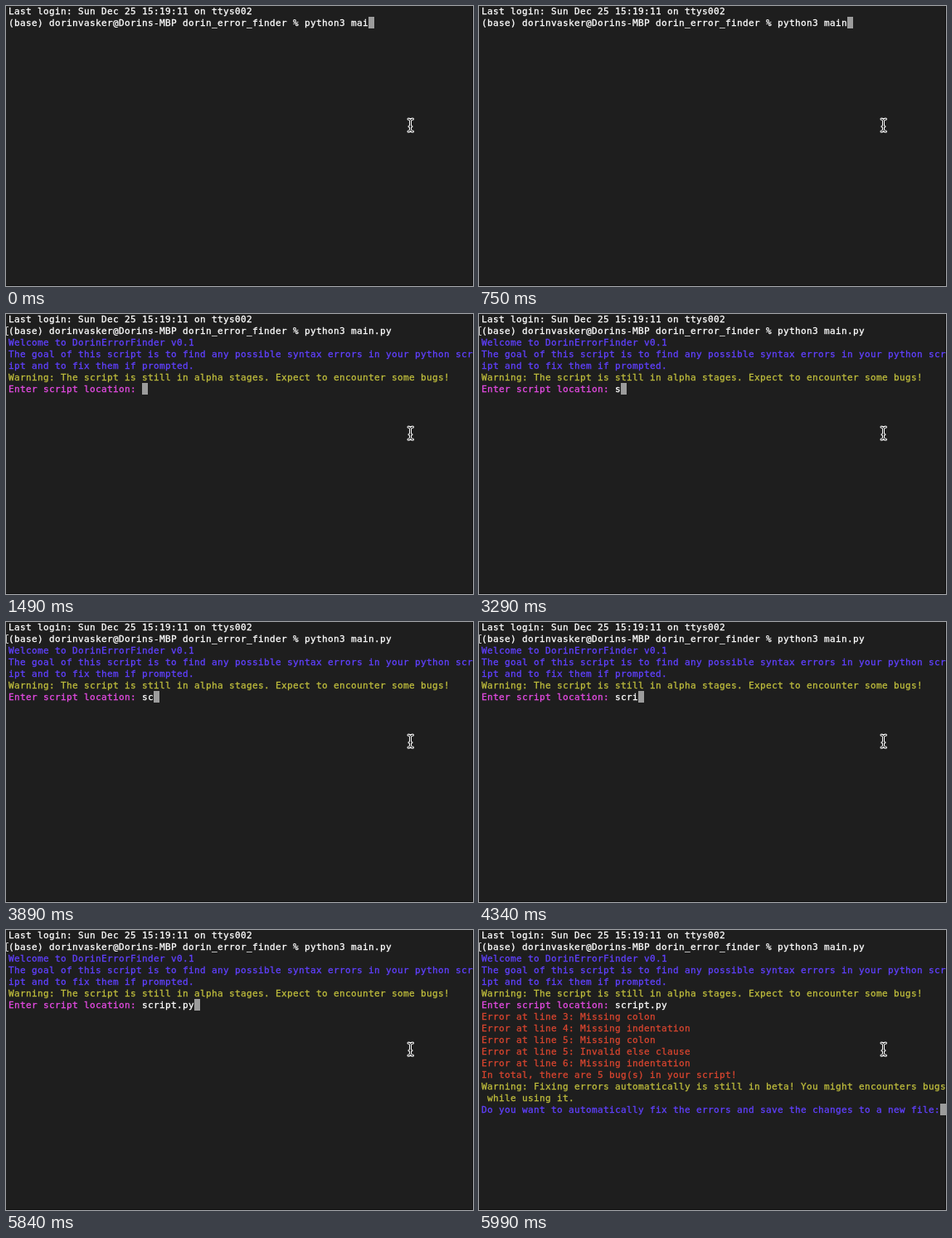
Animation, 563 px wide and 337 px high, one loop 8000 ms. Source, as an HTML page:

```html
<!DOCTYPE html>
<html lang="en">
<head>
<meta charset="utf-8">
<title>Terminal session</title>
<style>
  html, body { margin: 0; width: 100%; height: 100%; overflow: hidden; background: #1e1e1e; }
  svg { display: block; width: 563px; height: 337px; }
  text {
    font: 11px "DejaVu Sans Mono", "Liberation Mono", monospace;
    white-space: pre;
    stroke-width: .3px;
  }
</style>
</head>
<body>
<svg viewBox="0 0 563 337">
  <rect width="563" height="337" fill="#1e1e1e"/>
  <path d="M562.5 0V336.5H0" fill="none" stroke="#101010"/>
  <g id="screen"></g>
  <path id="mark" d="M3 15.5H.5V25.5H3" fill="none" stroke="#c4c4c4"/>
  <rect id="cursor" width="7" height="14" fill="#9c9c9c"/>
  <g fill="none" stroke-linecap="round" stroke-linejoin="round">
    <path id="beam" d="M485 136Q487.5 136 487.5 138.5Q487.5 136 490.500 136M487.500 138.500V148.500M485 151Q487.500 151 487.500 148.500Q487.500 151 490.500 151M486 145H489" stroke="#fff" stroke-width="3"/>
    <use href="#beam" id="core"/>
  </g>
</svg>
<script>
const LOOP = 8000, CELL = 7, ROW = 14, LEFT = 3;
const WHITE = '#ffffff', BLUE = '#6040ff', YELLOW = '#bfbd3c', PINK = '#e44be2', RED = '#d8452f';
const SHELL = '(base) dorinvasker@Dorins-MBP dorin_error_finder % python3 ';
const ASK = 'Enter script location: ';
const RUN_AT = 1490, RESULT_AT = 5990;

// Each step: start time, what has been typed by then
const COMMAND = [[0, 'mai'], [150, 'main'], [300, 'main.'], [750, 'main'], [890, 'main.'], [1190, 'main.py']];
const ANSWER = [[0, ''], [3290, 's'], [3890, 'sc'], [4040, 'scr'], [4340, 'scri'], [4640, 'scrip'],
  [4790, 'script.'], [5390, 'script.p'], [5840, 'script.py']];

const INTRO = [
  [BLUE, 'Welcome to DorinErrorFinder v0.1'],
  [BLUE, 'The goal of this script is to find any possible syntax errors in your python scr'],
  [BLUE, 'ipt and to fix them if prompted.'],
  [YELLOW, 'Warning: The script is still in alpha stages. Expect to encounter some bugs!']
];
const RESULT = [
  [RED, 'Error at line 3: Missing colon'],
  [RED, 'Error at line 4: Missing indentation'],
  [RED, 'Error at line 5: Missing colon'],
  [RED, 'Error at line 5: Invalid else clause'],
  [RED, 'Error at line 6: Missing indentation'],
  [RED, 'In total, there are 5 bug(s) in your script!'],
  [YELLOW, 'Warning: Fixing errors automatically is still in beta! You might encounters bugs'],
  [YELLOW, ' while using it.'],
  [BLUE, 'Do you want to automatically fix the errors and save the changes to a new file:']
];

const NS = 'http://www.w3.org/2000/svg';
const byId = id => document.getElementById(id);
const screen = byId('screen'), cursor = byId('cursor'), mark = byId('mark');

// Dark core of the pointer: same outline, thinner line
const core = byId('beam').cloneNode();
core.removeAttribute('id');
core.setAttribute('stroke', '#151515');
core.setAttribute('stroke-width', 1);
byId('core').replaceWith(core);

const typed = (steps, t) => steps.filter(([at]) => at <= t).pop()[1];

// A line is a list of alternating colours and strings
function linesAt(t) {
  const lines = [
    [WHITE, 'Last login: Sun Dec 25 15:19:11 on ttys002'],
    [WHITE, SHELL + typed(COMMAND, t)]
  ];
  if (t >= RUN_AT) lines.push(...INTRO, [PINK, ASK, WHITE, typed(ANSWER, t)]);
  if (t >= RESULT_AT) lines.push(...RESULT);
  return lines;
}

function addText(row, col, color, str) {
  const el = document.createElementNS(NS, 'text');
  el.setAttribute('x', [...str].map((_, i) => LEFT + (col + i) * CELL).join(' '));
  el.setAttribute('y', 10 + row * ROW);
  el.setAttribute('fill', color);
  el.setAttribute('stroke', color);
  el.textContent = str;
  screen.append(el);
}

let shown = '';
function draw(t) {
  const lines = linesAt(t), key = lines.join('\n');
  if (key === shown) return;
  shown = key;
  screen.replaceChildren();
  let col = 0;
  lines.forEach((line, row) => {
    col = 0;
    for (let i = 0; i < line.length; i += 2) {
      if (line[i + 1]) addText(row, col, line[i], line[i + 1]);
      col += line[i + 1].length;
    }
  });
  cursor.setAttribute('x', LEFT + col * CELL);
  cursor.setAttribute('y', (lines.length - 1) * ROW - 1);
  mark.style.display = t >= RUN_AT ? '' : 'none';
}

const start = performance.now();
function tick() {
  draw((performance.now() - start) % LOOP);
  requestAnimationFrame(tick);
}
tick();
</script>
</body>
</html>
```
